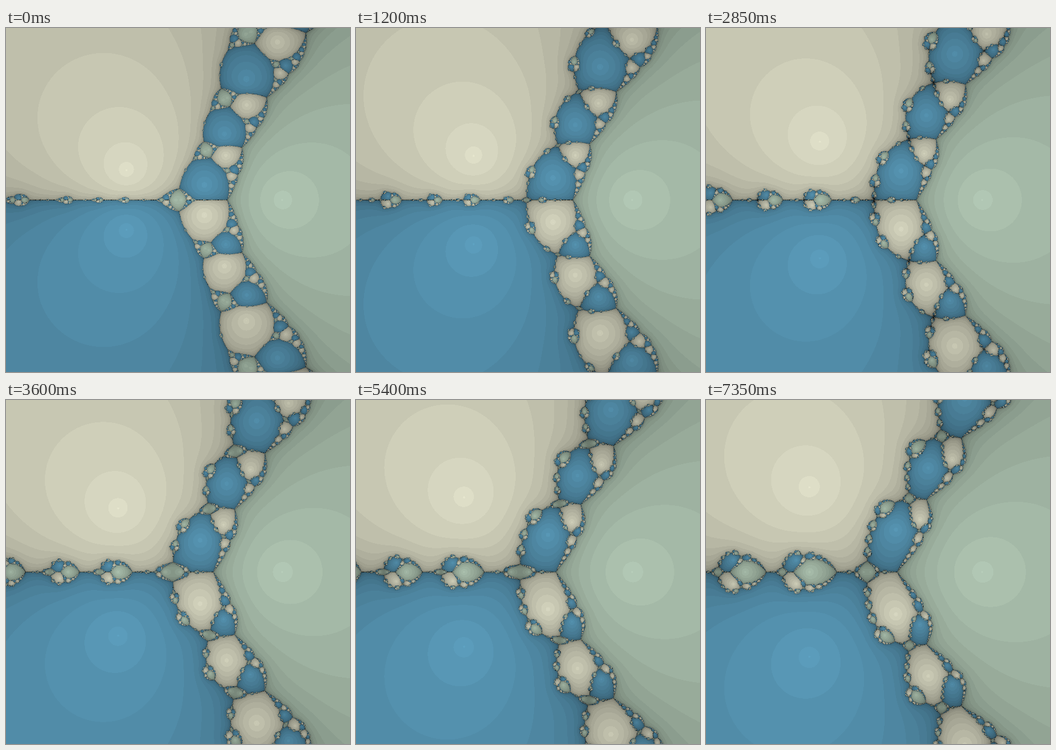
Animation of 601 by 601 pixels, one loop 7.5 s. Source, as an HTML page with a canvas:

```html
<!DOCTYPE html>
<html lang="en">
<head>
<meta charset="utf-8">
<title>Newton basins</title>
<style>
  html, body { margin: 0; width: 100%; height: 100%; overflow: hidden; background: #000; }
  canvas { display: block; width: 601px; height: 601px; }
</style>
</head>
<body>
<canvas id="stage" width="601" height="601"></canvas>
<script>
const SIZE = 601, MID = 300, UNIT = 182;
const STEPS = 50, STEP_MS = 150;
const MAX_ITER = 29, FADE = 0.034, NEAR = 0.01;

const GREEN = 0, BEIGE = 1, BLUE = 2;
const BASE = [[183, 206, 186], [230, 230, 206], [94, 162, 194]];

// One packed colour per root and iteration count.
const shades = BASE.map(rgb => Array.from({ length: MAX_ITER + 1 }, (_, n) => {
  const [r, g, b] = rgb.map(v => Math.round(v * Math.max(0, 1 - FADE * n)));
  return (255 << 24 | b << 16 | g << 8 | r) >>> 0;
}));

const ctx = document.getElementById('stage').getContext('2d');
const image = ctx.createImageData(SIZE, SIZE);
const pixels = new Uint32Array(image.data.buffer);

// Newton's method on (z - 1)(z² + pz + q); p and q grow evenly with each step.
function draw(step) {
  const p = 0.989 + 0.00665 * step;
  const q = 0.3265 + 0.01566 * step;
  const a = p - 1, b = q - p, c = -q;
  const re = -p / 2, im = Math.sqrt(q - p * p / 4);
  const near2 = NEAR * NEAR;

  for (let row = 0; row <= MID; row++) {
    for (let col = 0; col < SIZE; col++) {
      let x = (col - MID) / UNIT, y = (MID - row) / UNIT;
      let root = GREEN, n = 0;
      for (; n < MAX_ITER; n++) {
        const yy = y * y;
        const dx = x - re, dx2 = dx * dx;
        if ((x - 1) * (x - 1) + yy < near2) { root = GREEN; break; }
        if (dx2 + (y - im) * (y - im) < near2) { root = BEIGE; break; }
        if (dx2 + (y + im) * (y + im) < near2) { root = BLUE; break; }

        const sx = x * x - yy, sy = 2 * x * y;
        const ux = sx + a * x + b, uy = sy + a * y;
        const fx = ux * x - uy * y + c, fy = ux * y + uy * x;
        const gx = 3 * sx + 2 * a * x + b, gy = 3 * sy + 2 * a * y;
        const d = gx * gx + gy * gy || 1e-12;
        x -= (fx * gx + fy * gy) / d;
        y -= (fy * gx - fx * gy) / d;
      }
      // The lower half mirrors the upper one with the paired roots swapped.
      const twin = root === GREEN ? GREEN : BEIGE + BLUE - root;
      pixels[(SIZE - 1 - row) * SIZE + col] = shades[twin][n];
      pixels[row * SIZE + col] = shades[root][n];
    }
  }
  ctx.putImageData(image, 0, 0);
}

const start = performance.now();
let shown = -1;

function tick() {
  const elapsed = Math.max(0, performance.now() - start);
  const step = Math.floor(elapsed / STEP_MS) % STEPS;
  if (step !== shown) {
    draw(step);
    shown = step;
  }
  requestAnimationFrame(tick);
}
tick();
</script>
</body>
</html>
```
